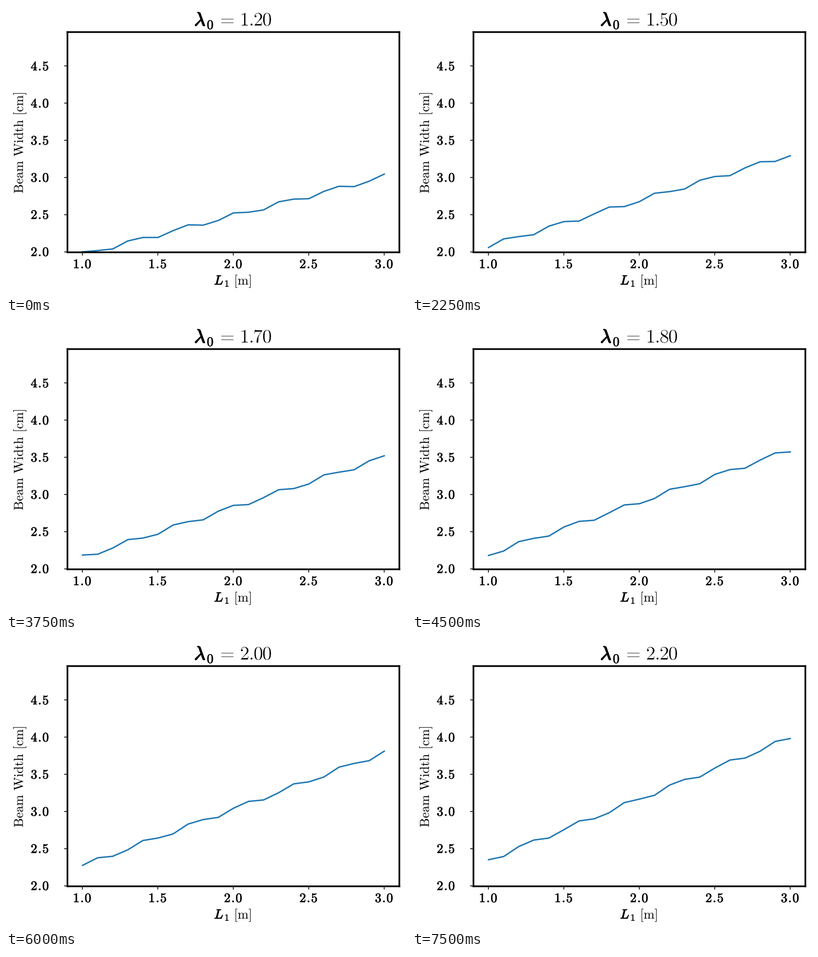
These frames come from a looping animation (880 by 637 pixels, 8000 ms). A matplotlib script:

```python
import numpy as np
import matplotlib.pyplot as plt
from matplotlib.animation import FuncAnimation
from matplotlib.patches import PathPatch
from matplotlib.path import Path
from matplotlib.textpath import TextPath
from matplotlib.transforms import Affine2D

plt.rcParams["mathtext.fontset"] = "cm"

W, H, DPI = 880, 637, 100
PX = 72 / DPI                    # points per pixel
LEFT, RIGHT, TOP, BOTTOM = 135.2, 865.4, 57.5, 542.9
STEPS_PER_HOLD = 3               # 3 x 250 ms for each wavelength
TITLE_Y = 43.3

lengths = np.linspace(1, 3, 21)


def widths(wave):
    """Straight rise that steepens with the wavelength, plus drifting fringes."""
    shift = wave - 1.2
    start = 1.965 + 0.38 * shift
    end = 3.01 + 0.98 * shift
    trend = start + (end - start) * (lengths - 1) / 2
    fringe = (lengths - 2.5 + 0.75 * shift) / 0.33
    return trend - 0.035 * np.cos(2 * np.pi * fringe)


def shape(tex, em, x, y, angle=0, center=False):
    """Outline whose ink starts (or is centred) at x, on baseline y."""
    path = TextPath((0, 0), f"${tex}$", size=em)
    box = path.get_extents()
    origin = (box.x0 + box.x1) / 2 if center else box.x0
    move = Affine2D().translate(-origin, 0).scale(1, -1).rotate_deg(-angle).translate(x, y)
    return move.transform_path(path)


def number(text, em, x, y, face, step):
    """Figures set in equal cells of step * em, the point in a narrower one."""
    parts = []
    for char in text:
        cell = em * step * (0.556 if char == "." else 1)
        parts.append(shape(rf"\{face}{{{char}}}", em, x + cell / 2, y, center=True))
        x += cell
    return Path.make_compound_path(*parts)


fig = plt.figure(figsize=(W / DPI, H / DPI), dpi=DPI, facecolor="white")
ax = fig.add_axes([LEFT / W, 1 - BOTTOM / H, (RIGHT - LEFT) / W, (BOTTOM - TOP) / H])
ax.set(xlim=(0.9, 3.1), ylim=(1.992, 4.957))
ax.set_xticks(np.arange(1, 3.1, 0.5))
ax.set_yticks(np.arange(2, 4.6, 0.5))
ax.tick_params(length=7.3 * PX, width=1.67 * PX, labelbottom=False, labelleft=False)
for spine in ax.spines.values():
    spine.set_linewidth(3.7 * PX)
    spine.set_snap(False)

stage = fig.add_axes([0, 0, 1, 1])
stage.set(xlim=(0, W), ylim=(H, 0))
stage.axis("off")


def ink(path, stroke=0, edge="black"):
    """Black glyphs; a black edge makes them bolder, a white one lighter."""
    return stage.add_patch(PathPatch(path, facecolor="black", edgecolor=edge,
                                     linewidth=stroke * PX, joinstyle="round"))


def tick_label(value, x, y):
    ink(number(f"{value:.1f}", 28.6, x, y, "mathbf", 0.574), 0.9)


for v in ax.get_xticks():
    tick_label(v, 168.2 + (v - 1) * 332 - 21.7, 577.8)
for v in ax.get_yticks():
    tick_label(v, 53.3, 541.7 - (v - 2) * 163.7 + 9.4)

# Axis labels
ink(shape("L", 29, 459, 614), 1.3)
ink(shape(r"\mathbf{1}", 20.4, 482.5, 618.6), 0.7)
ink(shape(r"\mathrm{[m]}", 28.8, 505, 614))
for word, y in (("Beam", 412), ("Width", 331.3), ("[cm]", 238)):
    ink(shape(rf"\mathrm{{{word}}}", 28.8, 37.4, y, angle=90))

# Title
ink(shape(r"\lambda", 42, 416.3, TITLE_Y), 2)
ink(shape(r"\mathbf{0}", 29, 443, TITLE_Y + 7.5), 0.9)
ink(shape("=", 41, 473.5, TITLE_Y), 0.5, "white")
title = ink(Path([(0, 0)]), 0.5, "white")

line, = ax.plot(lengths, widths(1.2), color="#1f77b4", linewidth=3.1 * PX)


def draw(i):
    wave = 1.2 + i // STEPS_PER_HOLD / 10
    line.set_ydata(widths(wave))
    title.set_path(number(f"{wave:.2f}", 42.2, 515.6, TITLE_Y, "mathrm", 0.455))
    return line, title


anim = FuncAnimation(fig, draw, frames=32, interval=250, repeat=True, repeat_delay=0)
plt.show()
```
